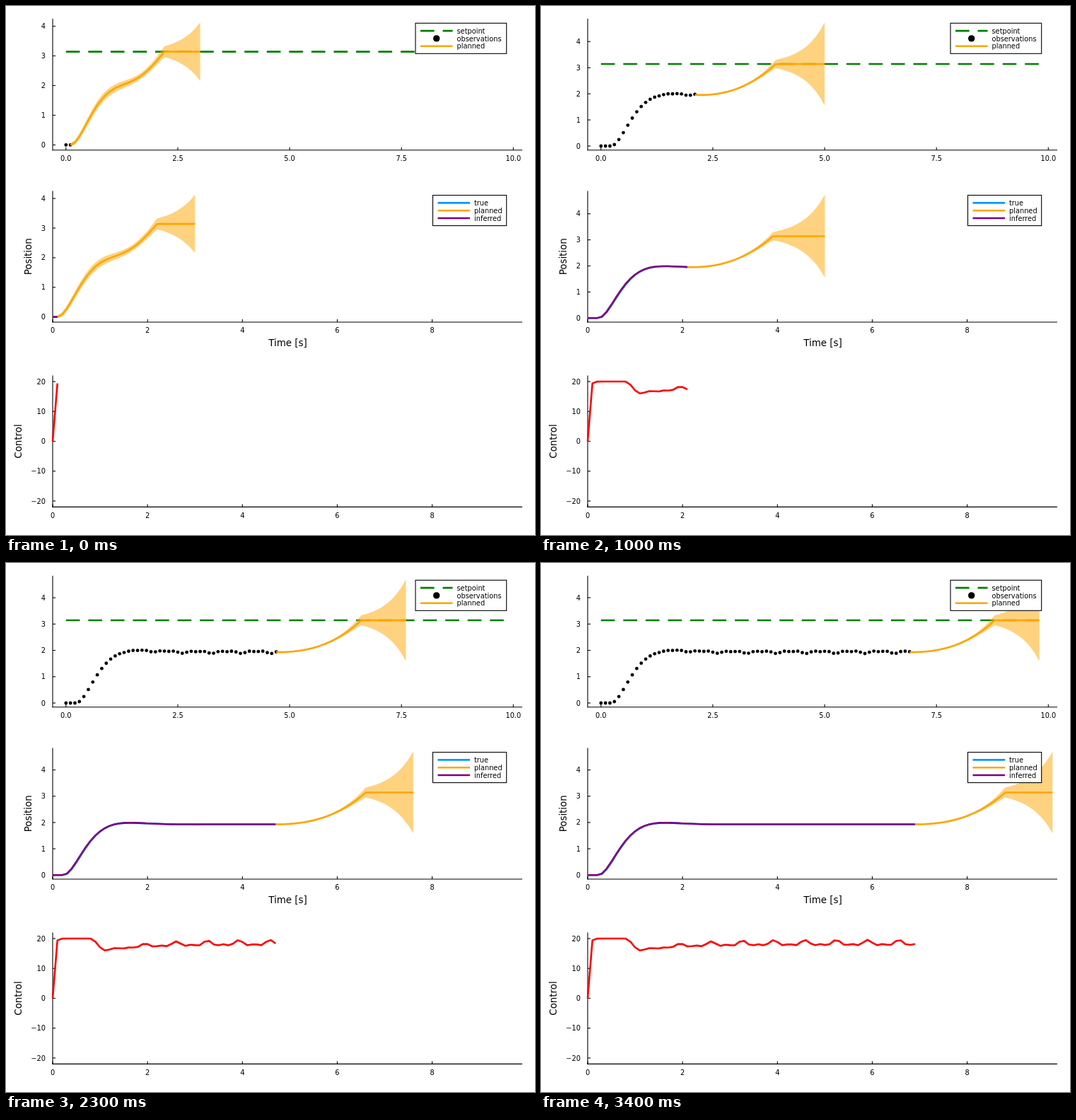
Write an HTML page with a canvas that moves like this. It is 748 by 748 pixels and loops after 3.45 s.

```html
<!DOCTYPE html>
<html>
<head>
<meta charset="utf-8">
<style>
  html, body { margin: 0; width: 748px; height: 748px; overflow: hidden; background: #fff; }
  canvas { display: block; }
</style>
</head>
<body>
<canvas id="stage" width="748" height="748"></canvas>
<script>
const ctx = document.getElementById('stage').getContext('2d');
const STEPS = 69, STEP_MS = 50, DT = 0.1, HORIZON = 29;
const LEFT = 66, RIGHT = 730, SETPOINT = Math.PI;
const GREEN = '#008000', ORANGE = '#ffa500', BLUE = '#009afa', PURPLE = '#800080', RED = '#ff0000';
const FONT = '"DejaVu Sans", sans-serif';

const clamp01 = v => Math.max(0, Math.min(1, v));
const smooth = u => u * u * (3 - 2 * u);

// The position follows a slightly underdamped step response after a short delay.
function inferred(k) {
  const s = Math.max(0, k - 2.25);
  return 1.93 * (1 - Math.exp(-0.25 * s) * (Math.cos(0.224 * s) + 1.116 * Math.sin(0.224 * s)));
}
const truth = k => inferred(k - 0.12);

// Once settled, sensor noise shows up mirrored in the control.
const settled = k => 1 - Math.exp(-Math.max(0, k - 11) / 8);
function ripple(k) {
  const phase = 2 * Math.PI * (k - 26) / 6.6;
  return settled(k) * (0.7 * Math.cos(phase) + 0.5 * Math.cos(2 * phase));
}
const observed = k => inferred(k) + 0.01 * settled(k) - 0.05 * ripple(k);

function control(k) {
  const full = 20 * (1 - Math.exp(-3.5 * k));
  const hold = 16 + 2.4 * settled(k) + ripple(k);
  return full + (hold - full) * smooth(clamp01((k - 8) / 3));
}

function makePlan(k) {
  const hump = (k / 9 * Math.exp(1 - k / 9)) ** 2;
  const reach = 1.9 + 0.22 * Math.exp((1 - k) / 3) - 0.25 * hump;
  const arriveSpread = 0.19 - 0.08 * hump;
  const start = inferred(k), rise = SETPOINT - start;
  const m0 = (inferred(k + 1) - start) / DT * reach / rise;
  const swing = clamp01(1 - (k - 2) / 4);
  const m1 = (1.6 + 0.15 * swing) * reach / rise;
  const base = 0.03 + 0.02 * swing;
  return Array.from({ length: HORIZON + 1 }, (_, i) => {
    const s = i * DT, u = Math.min(1, s / reach), v = 1 - u;
    const curve = smooth(u) + m0 * u * v * v - m1 * u * u * v
      + swing * (11.8 - 6.5 * u) * u * u * v ** 3;
    const spread = u < 1
      ? base + (arriveSpread - base) * u ** 6 + swing * 0.6 * u * v * v
      : arriveSpread * Math.exp(2.1 * (s - reach));
    return { t: k * DT + s, y: start + rise * curve, spread };
  });
}

function stroke(points, color, width = 2.6, dash = []) {
  ctx.beginPath();
  points.forEach(p => ctx.lineTo(...p));
  ctx.strokeStyle = color;
  ctx.lineWidth = width;
  ctx.setLineDash(dash);
  ctx.stroke();
}

function dot(x, y, r) {
  ctx.beginPath();
  ctx.arc(x, y, r, 0, 2 * Math.PI);
  ctx.fillStyle = '#000';
  ctx.fill();
}

function text(str, x, y, align = 'center', size = 9.8) {
  ctx.font = `${size}px ${FONT}`;
  ctx.textAlign = align;
  ctx.fillStyle = '#000';
  ctx.fillText(str, x, y);
}

function sideLabel(str, x, y) {
  ctx.save();
  ctx.translate(x, y);
  ctx.rotate(-Math.PI / 2);
  text(str, 0, 0, 'center', 13.4);
  ctx.restore();
}

function makePanel(top, bottom, x0, xScale, low, high) {
  return {
    top, bottom,
    x: t => x0 + t * xScale,
    y: v => bottom - (v - low) / (high - low) * (bottom - top)
  };
}

function drawAxes(panel, xTicks, yTicks, digits = 0) {
  const { top, bottom } = panel;
  stroke([[LEFT, top], [LEFT, bottom + 0.5]], '#000', 1.1);
  stroke([[LEFT - 0.5, bottom], [RIGHT, bottom]], '#000', 1.1);
  for (const t of xTicks) {
    const x = panel.x(t);
    stroke([[x, bottom], [x, bottom - 4]], '#000', 1.1);
    text(t.toFixed(digits), x, bottom + 15.2);
  }
  for (const v of yTicks) {
    const y = panel.y(v);
    stroke([[LEFT, y], [LEFT + 4, y]], '#000', 1.1);
    text(String(v).replace('-', '−'), 56, y + 3.6, 'right');
  }
}

const upTo = k => Array.from({ length: k + 1 }, (_, i) => i);

const drawSeries = (panel, k, series, color) =>
  stroke(upTo(k).map(i => [panel.x(i * DT), panel.y(series(i))]), color);

function drawPlan(panel, plan) {
  const edge = sign => plan.map(p => [panel.x(p.t), panel.y(p.y + sign * p.spread)]);
  ctx.beginPath();
  [...edge(1), ...edge(-1).reverse()].forEach(p => ctx.lineTo(...p));
  ctx.fillStyle = 'rgba(255,165,0,0.5)';
  ctx.fill();
  stroke(edge(0), ORANGE);
}

function drawLegend(x, y, entries) {
  const width = 707.7 - x;
  ctx.fillStyle = '#fff';
  ctx.fillRect(x, y, width, 43);
  ctx.setLineDash([]);
  ctx.lineWidth = 1.1;
  ctx.strokeStyle = '#000';
  ctx.strokeRect(x, y, width, 43);
  entries.forEach(([label, color, dash], i) => {
    const rowY = y + 10.8 * (i + 1);
    if (color) stroke([[x + 7, rowY], [x + 52.5, rowY]], color, 2.6, dash);
    else dot(x + 29.7, rowY, 4.7);
    text(label, x + 58.5, rowY + 3.6, 'left');
  });
}

function draw(k) {
  ctx.fillStyle = '#fff';
  ctx.fillRect(0, 0, 748, 748);

  const plan = makePlan(k);
  const min = Math.min(-0.015, ...plan.map(p => p.y - p.spread));
  const max = Math.max(...plan.map(p => p.y + p.spread));
  const margin = 0.03 * (max - min), low = min - margin, high = max + margin;
  const yTicks = upTo(Math.floor(high));
  const seconds = [0, 2, 4, 6, 8], dash = [19.6, 11.95];

  const tracking = makePanel(18, 203.8, 84.8, 63.25, low, high);
  drawAxes(tracking, [0, 2.5, 5, 7.5, 10], yTicks, 1);
  const setY = tracking.y(SETPOINT);
  stroke([[tracking.x(0), setY], [tracking.x(9.8), setY]], GREEN, 2.6, dash);
  upTo(k).forEach(i => dot(tracking.x(i * DT), tracking.y(observed(i)), 2.4));
  drawPlan(tracking, plan);
  drawLegend(579, 24.3, [['setpoint', GREEN, dash], ['observations'], ['planned', ORANGE]]);

  const position = makePanel(261.6, 447, LEFT, 67.07, low, high);
  drawAxes(position, seconds, yTicks);
  drawSeries(position, k, truth, BLUE);
  drawPlan(position, plan);
  drawSeries(position, k, inferred, PURPLE);
  drawLegend(603.5, 267.6, [['true', BLUE], ['planned', ORANGE], ['inferred', PURPLE]]);
  text('Time [s]', 398.5, 481, 'center', 13.4);
  sideLabel('Position', 36, 354.3);

  const action = makePanel(522.6, 708.4, LEFT, 67.07, -22, 22);
  drawAxes(action, seconds, [-20, -10, 0, 10, 20]);
  drawSeries(action, k, control, RED);
  sideLabel('Control', 22, 615.5);
}

function tick() {
  draw(1 + Math.floor(performance.now() / STEP_MS) % STEPS);
  requestAnimationFrame(tick);
}
tick();
</script>
</body>
</html>
```
